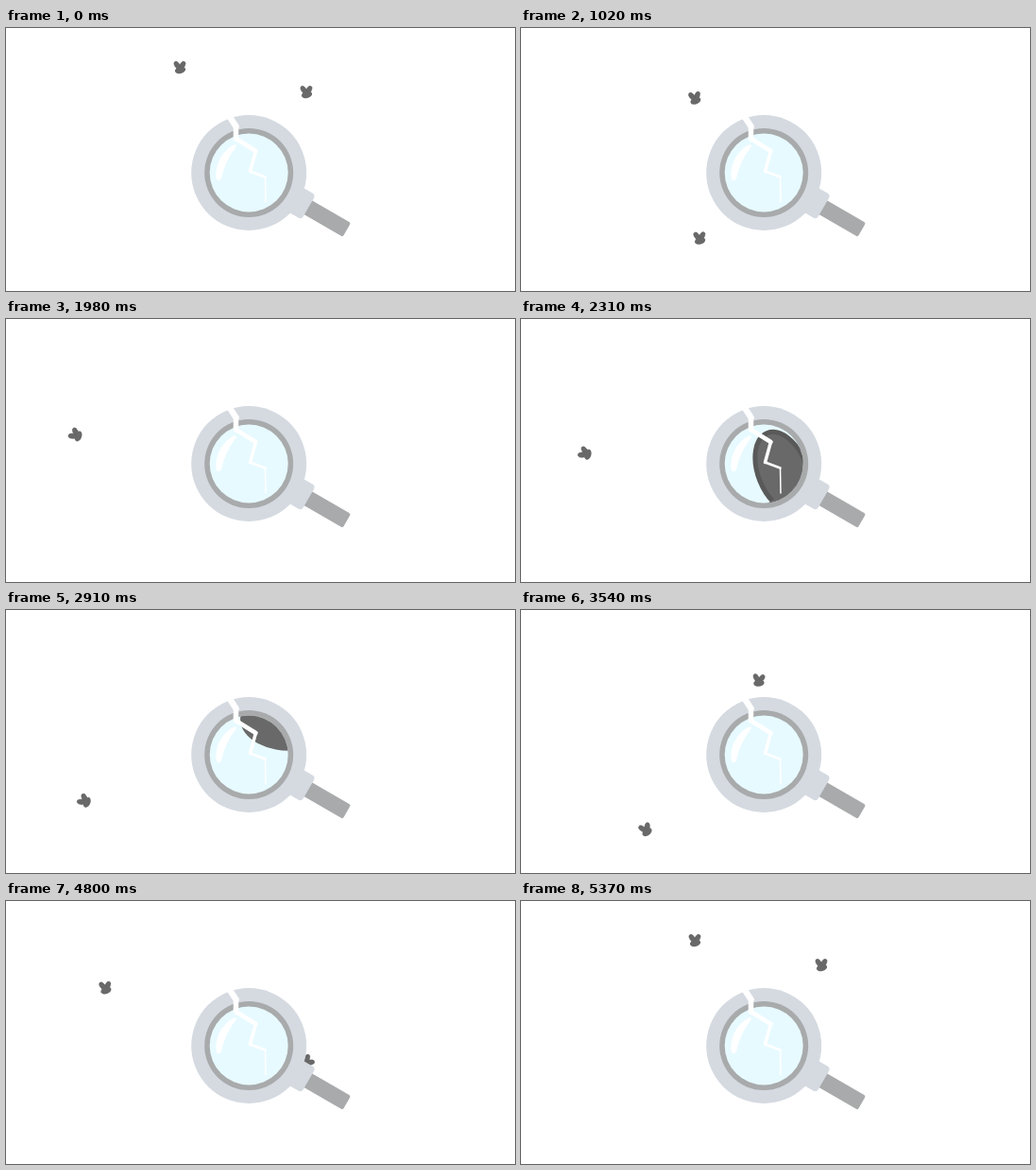
An HTML page with a canvas that plays this animation: 539 px wide and 278 px high, repeating every 5400 ms.

```html
<!DOCTYPE html>
<html lang="en">
<head>
<meta charset="utf-8">
<title>Broken magnifier and flies</title>
<style>
  html, body { margin: 0; width: 539px; height: 278px; overflow: hidden; background: #fff; }
  canvas { display: block; }
</style>
</head>
<body>
<canvas id="stage" width="539" height="278"></canvas>
<script>
const ctx = document.getElementById('stage').getContext('2d');
const LOOP = 5400, STEP = 30, START = 180, END = 5370;
const LENS = { x: 257.2, y: 153, r: 41.5 };
const RING = '#d5dae1', METAL = '#a8aaab', DARK = '#696969', EDGE = '#595959';
const ZOOM = 10, SPREAD = 4;

// Each route runs around the magnifier, one point every 450 ms
const LEG = 450, FIRST = 120;
const routeA = [
  [142, 34], [150, 130], [189, 222], [232, 242], [256, 184], [269, 159], [263, 145],
  [297, 86], [217, 74], [175, 95], [123, 110], [95, 55], [170, 30]
];
const routeB = [
  [343, 95], [334, 48], [184, 74], [123, 90], [77, 119], [68, 147], [79, 195],
  [106, 222], [155, 238], [238, 253], [298, 205], [342, 115], [341, 70]
];

const rad = deg => deg * Math.PI / 180;
const sway = (t, size, from) => size * Math.sin(Math.PI * (t - from) / 3000);

// Catmull-Rom curve through a route
function along(route, t) {
  const s = (t - FIRST) / LEG, i = Math.floor(s), u = s - i;
  const at = k => route[Math.min(route.length - 1, Math.max(0, k))];
  const [p, a, b, n] = [at(i - 1), at(i), at(i + 1), at(i + 2)];
  return [0, 1].map(c => a[c] + u / 2 * (b[c] - p[c] +
    u * (2 * p[c] - 5 * a[c] + 4 * b[c] - n[c] + u * (3 * (a[c] - b[c]) + n[c] - p[c]))));
}

function disc(r, color) {
  ctx.fillStyle = color;
  ctx.beginPath();
  ctx.arc(LENS.x, LENS.y, r, 0, Math.PI * 2);
  ctx.fill();
}

function oval(x, y, rx, ry, deg) {
  ctx.beginPath();
  ctx.ellipse(x, y, rx, ry, rad(deg), 0, Math.PI * 2);
  ctx.fill();
}

function fly([x, y], deg, scale) {
  ctx.save();
  ctx.translate(x, y);
  ctx.rotate(rad(deg));
  ctx.scale(scale, scale);
  ctx.fillStyle = DARK;
  ctx.strokeStyle = EDGE;
  ctx.lineWidth = 0.5;
  for (const side of [1, -1]) {
    oval(side * 2.8, -2.2, 2.6, 4.4, side * 30);
    ctx.stroke();
  }
  oval(0.5, 3, 5.7, 3.6, -13);
  ctx.restore();
}

function bar(x, y, w, h, r, color) {
  ctx.fillStyle = color;
  ctx.beginPath();
  ctx.roundRect(x, y, w, h, r);
  ctx.fill();
}

function handle() {
  ctx.save();
  ctx.translate(LENS.x, LENS.y);
  ctx.rotate(rad(30));
  bar(66, -8, 54, 17, 2, METAL);
  bar(55, -15, 18, 30, 4, RING);
  ctx.restore();
}

function shine() {
  ctx.fillStyle = '#fff';
  ctx.beginPath();
  ctx.moveTo(243, 123);
  ctx.bezierCurveTo(231, 127, 220, 144, 223, 160);
  ctx.quadraticCurveTo(226, 163, 228, 159);
  ctx.quadraticCurveTo(232, 140, 244, 125);
  ctx.fill();
}

// A broken line that gets thinner with every bend
function crack() {
  const bends = [[235, 91], [243.5, 104], [243.5, 117], [264.5, 130], [258.5, 151.5], [274.5, 157.5], [275, 184]];
  ctx.strokeStyle = '#fff';
  ctx.lineCap = 'round';
  for (let i = 1; i < bends.length; i++) {
    ctx.lineWidth = 7.5 - i;
    ctx.beginPath();
    ctx.moveTo(...bends[i - 1]);
    ctx.lineTo(...bends[i]);
    ctx.stroke();
  }
}

function magnified([x, y], deg) {
  ctx.save();
  ctx.beginPath();
  ctx.arc(LENS.x, LENS.y, LENS.r, 0, Math.PI * 2);
  ctx.clip();
  fly([LENS.x + SPREAD * (x - LENS.x), LENS.y + SPREAD * (y - LENS.y)], deg, ZOOM);
  ctx.restore();
}

function draw(t) {
  const moving = t >= START && t < END;
  const a = moving ? along(routeA, t) : [184, 41.5];
  const b = moving ? along(routeB, t) : [318, 67.5];
  const turnA = moving ? sway(t, 9, 1200) : 0;
  const turnB = moving ? sway(t, -62, 900) : 0;

  ctx.fillStyle = '#fff';
  ctx.fillRect(0, 0, 539, 278);
  fly(a, turnA, 1);
  fly(b, turnB, 1);
  handle();
  disc(61, RING);
  disc(47, METAL);
  disc(LENS.r, '#e7faff');
  shine();
  magnified(a, turnA);
  crack();
}

const begin = performance.now();
function tick() {
  const t = (performance.now() - begin) % LOOP;
  draw(Math.floor(t / STEP) * STEP);
  requestAnimationFrame(tick);
}
tick();
</script>
</body>
</html>
```
